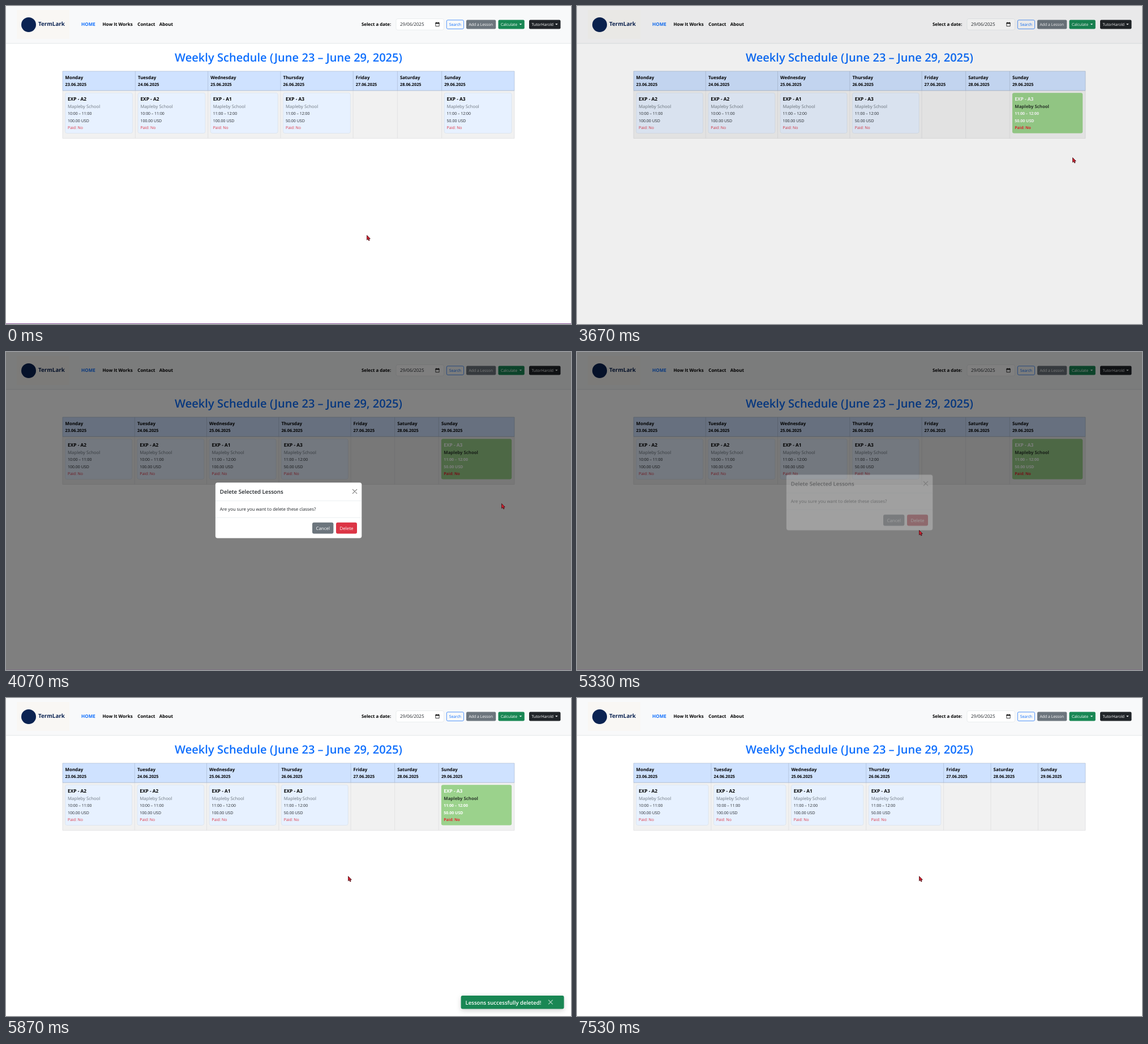
Recreate the animation shown at these times as an HTML page. Size 998 by 561 pixels, loop 8000 ms.

```html
<!DOCTYPE html>
<html lang="en">
<head>
<meta charset="utf-8">
<title>Weekly Schedule</title>
<style>
  html, body { margin: 0; width: 100%; height: 100%; overflow: hidden; background: #fff; }
  svg { display: block; width: 100%; height: 100%; }
  text {
    font-family: "Open Sans", "Noto Sans", sans-serif;
    text-rendering: geometricPrecision;
    white-space: pre;
  }
</style>
</head>
<body>
<svg id="stage" viewBox="0 0 998 561" xmlns="http://www.w3.org/2000/svg"></svg>
<script>
const LOOP = 8000;
const BLUE = '#0d6efd', GRAY = '#6c757d', GREEN = '#198754', DARK = '#212529', RED = '#dc3545';

// Drawing helpers
const text = (x, y, size, str, fill = '#000', weight = 400, anchor = 'start') =>
  `<text x="${x}" y="${y}" font-size="${size}" fill="${fill}" font-weight="${weight}" text-anchor="${anchor}">${str}</text>`;
const rect = (x, y, w, h, fill, r = 0, extra = '') =>
  `<rect x="${x}" y="${y}" width="${w}" height="${h}" rx="${r}" fill="${fill}" ${extra}/>`;
const line = (x1, y1, x2, y2, stroke, width = .6) =>
  `<path d="M${x1} ${y1}L${x2} ${y2}" stroke="${stroke}" stroke-width="${width}"/>`;
const cross = (x, y, size, stroke) =>
  `<path d="M${x} ${y}l${size} ${size}m0 ${-size}l${-size} ${size}" stroke="${stroke}" stroke-width="1.1" stroke-linecap="round"/>`;
const group = (id, body) => `<g id="${id}">${body}</g>`;
const caret = x => `<path d="M${x} 31.2h4.4l-2.2 2.3z" fill="#fff"/>`;
const button = (x, w, label, fill) =>
  rect(x, 24.5, w, 16, fill, 2.2) + text(x + 4.5, 35, 6.85, label, '#fff');

function header() {
  return rect(0, 0, 998, 66, '#f8f9fa') + line(0, 66, 998, 66, '#dee0e3', .8)
    + rect(19, 7, 93, 51, '#f9f7f4')
    + '<circle cx="40" cy="33" r="13" fill="#0b2352"/>'
    + text(57, 35, 9.8, 'TermLark', '#0b2352', 700)
    + text(133, 35.4, 8.1, 'HOME', BLUE, 700)
    + text(170.5, 35.4, 8, 'How It Works', '#000', 700)
    + text(232.3, 35.4, 8, 'Contact', '#000', 700)
    + text(270.7, 35.4, 8, 'About', '#000', 700)
    + text(628, 35.4, 7.85, 'Select a date:', '#000', 700)
    + rect(689, 22.5, 84.5, 19.8, '#fff', 3, 'stroke="#dee2e6" stroke-width=".6"')
    + text(696, 35.4, 8, '29/06/2025', DARK)
    + '<path d="M758.9 30h6.2v5.7h-6.2z" fill="none" stroke="#111" stroke-width=".8"/>'
    + rect(758.5, 29.3, 7, 2, '#111') + rect(759.6, 28.4, 1, 1.4, '#111') + rect(763.4, 28.4, 1, 1.4, '#111')
    + rect(778.3, 24.8, 30.2, 15.6, 'none', 2.2, `stroke="${BLUE}" stroke-width=".7"`)
    + text(793.4, 35, 6.75, 'Search', BLUE, 400, 'middle')
    + button(813, 52.3, 'Add a Lesson', GRAY)
    + button(869.5, 46.3, 'Calculate', GREEN) + caret(906.8)
    + button(924, 55.5, 'TutorHarold', DARK) + caret(970.2)
    + text(499, 98, 20.1, 'Weekly Schedule (June 23 – June 29, 2025)', BLUE, 600, 'middle');
}

const DAYS = ['Monday', 'Tuesday', 'Wednesday', 'Thursday', 'Friday', 'Saturday', 'Sunday'];
const LESSONS = {
  0: ['A2', '10:00 – 11:00', '100.00'],
  1: ['A2', '10:00 – 11:00', '100.00'],
  2: ['A1', '11:00 – 12:00', '100.00'],
  3: ['A3', '11:00 – 12:00', '50.00'],
  6: ['A3', '11:00 – 12:00', '50.00'],
};

function lessonCard(x, w, [level, hours, price], picked) {
  const ink = picked ? '#fff' : '#000', weight = picked ? 700 : 400, tx = x + 9;
  return rect(x + 4.6, 153.3, w - 9.4, 71.2, '#e7f1ff', 3.2,
      picked ? 'id="picked"' : 'stroke="#d6dee8" stroke-width=".6"')
    + text(tx, 167.2, 8.35, `EXP - ${level}`, ink, 700)
    + text(tx, 179.7, 7.8, 'Mapleby School', picked ? '#2c3a2c' : GRAY, weight)
    + text(tx, 192, 6.93, hours, picked ? ink : DARK, weight)
    + text(tx, 204.6, 7, `${price} USD`, picked ? ink : DARK, weight)
    + text(tx, 217.2, 6.9, 'Paid: No', picked ? '#e8232f' : RED, weight);
}

function table(id, edges, { picked = -1, removed = -1 } = {}) {
  let out = rect(100, 115, 798, 34, '#cfe2ff') + rect(100, 149, 798, 84.5, '#f1f1f1');
  edges.forEach(x => {
    out += line(x, 115, x, 149, '#a6b5cc') + line(x, 149, x, 233.5, '#d8d9da');
  });
  out += line(100, 115, 898, 115, '#a6b5cc') + line(100, 149.2, 898, 149.2, '#a6b5cc', .8)
    + line(100, 233.5, 898, 233.5, '#d8d9da');
  DAYS.forEach((day, i) => {
    const x = edges[i];
    out += text(x + 4.6, 128.9, 7.9, day, '#000', 700)
      + text(x + 4.6, 141.3, 7.3, `${23 + i}.06.2025`, '#000', 700);
    if (LESSONS[i] && i !== removed) out += lessonCard(x, edges[i + 1] - x, LESSONS[i], i === picked);
  });
  return group(id, out);
}

const menu = () =>
  rect(848, 198, 56.6, 82.6, '#fff', 3, 'stroke="#cfd2d6" stroke-width=".7"')
  + ['Edit', 'Copy', 'Mark Paid', 'Delete'].map((label, i) =>
      text(855, 212.5 + i * 19.5, 7.5, label, label === 'Delete' ? RED : DARK)).join('');

const modal = () =>
  rect(369.8, 230.2, 258.6, 98.4, '#fff', 4, 'stroke="#000" stroke-opacity=".18" stroke-width=".5"')
  + text(377.8, 250, 9.7, 'Delete Selected Lessons', DARK, 600)
  + cross(612.3, 242.3, 7.4, '#7a7a7a')
  + line(370, 262.6, 628.2, 262.6, '#dee2e6') + line(370, 292.1, 628.2, 292.1, '#dee2e6')
  + text(377.8, 280.2, 7.86, 'Are you sure you want to delete these classes?', DARK)
  + rect(541, 300.8, 37.4, 19.6, GRAY, 3) + text(559.7, 313.5, 7.9, 'Cancel', '#fff', 400, 'middle')
  + rect(583, 300.8, 37, 19.6, RED, 3, 'id="confirm"') + text(601.5, 313.5, 7.9, 'Delete', '#fff', 400, 'middle');

const toast = () =>
  rect(803.6, 525, 182, 23.6, GREEN, 3, 'style="filter:drop-shadow(0 3px 4px rgba(0,0,0,.17))"')
  + text(811.6, 540.5, 9.55, 'Lessons successfully deleted!', '#fff', 600)
  + cross(958.4, 533, 7, '#a5d0bc');

const pointer = '<path d="M.4 .5V8.8L2.3 7.1 3.8 10 5.2 9.3 3.8 6.5H6.3Z" fill="#d3202f" stroke="#3a0a10" stroke-width=".8" stroke-linejoin="round"/>';

document.getElementById('stage').innerHTML =
  rect(0, 0, 998, 561, '#fff')
  + group('page', header()
    + table('before', [100, 228.4, 356.7, 485, 613.2, 691.4, 769.6, 898])
    + table('chosen', [100, 227.3, 354.5, 481.8, 609, 686.6, 764.3, 898], { picked: 6 })
    + table('after', [100, 236.9, 373.8, 510.7, 647.6, 731, 814.4, 898], { removed: 6 }))
  + group('menu', menu())
  + rect(0, 0, 998, 561, '#000', 0, 'id="backdrop"')
  + group('edge', rect(0, 560, 998, 1, '#7d4a8c'))
  + group('modal', modal())
  + group('toast', toast())
  + group('pointer', pointer);

// Motion: rows of [time in ms, properties, easing to the next row]
function play(id, rows) {
  const frames = rows.map(([t, props, easing = 'linear']) => ({ ...props, easing, offset: t / LOOP }));
  document.getElementById(id).animate(frames, { duration: LOOP, iterations: Infinity });
}
const fade = (id, rows) => play(id, rows.map(([t, opacity, easing]) => [t, { opacity }, easing]));
const tint = (id, rows) => play(id, rows.map(([t, fill]) => [t, { fill }]));
const move = (id, rows) => play(id, rows.map(([t, x, y, easing]) =>
  [t, { transform: `translate(${x}px, ${y}px)` }, easing]));

// Visible only between two times, with hard cuts
function show(id, from, to) {
  const rows = [[from, 1, 'step-end']];
  if (from > 0) rows.unshift([0, 0, 'step-end']);
  if (to < LOOP) rows.push([to, 0, 'step-end']);
  rows.push([LOOP, to < LOOP ? 0 : 1]);
  fade(id, rows);
}

fade('page', [[0, 1, 'step-end'], [7320, 0, 'step-end'], [7520, 1], [LOOP, 1]]);
show('before', 0, 1660);
show('chosen', 1660, 7320);
show('after', 7520, LOOP);
show('menu', 2060, 3655);
fade('edge', [[0, 1, 'step-end'], [1660, 0, 'step-end'], [3800, .25, 'step-end'], [5600, 0], [LOOP, 0]]);
tint('picked', [[0, '#e7f1ff'], [1630, '#e7f1ff'], [1725, '#9bd28c'], [LOOP, '#9bd28c']]);

fade('backdrop', [[0, 0], [3652, 0], [3802, .5], [5461, .5], [5611, 0], [LOOP, 0]]);
fade('modal', [[0, 0], [3805, 0], [3955, 1], [5220, 1], [5370, 0], [LOOP, 0]]);
move('modal', [
  [0, 0, -26], [3805, 0, -26, 'ease-out'], [4070, 0, 0],
  [5220, 0, 0, 'ease-out'], [5520, 0, -26], [LOOP, 0, -26],
]);
tint('confirm', [[0, RED], [4660, RED], [4800, '#bb2d3b'], [LOOP, '#bb2d3b']]);
fade('toast', [[0, 0], [5640, 0], [5860, 1, 'step-end'], [7320, 0], [LOOP, 0]]);

move('pointer', [
  [0, 637, 404], [270, 637, 404, 'ease-in'], [400, 643, 406, 'ease-in-out'],
  [1130, 847, 201, 'ease-in-out'], [1330, 847, 197],
  [2270, 847, 197, 'ease-in-out'], [3130, 877, 261.5, 'ease-in-out'], [3400, 875, 267],
  [4080, 875, 267, 'ease-in'], [4475, 695, 312, 'ease-out'],
  [4750, 618, 320.5, 'ease-in-out'], [5130, 604, 314], [LOOP, 604, 314],
]);
</script>
</body>
</html>
```
